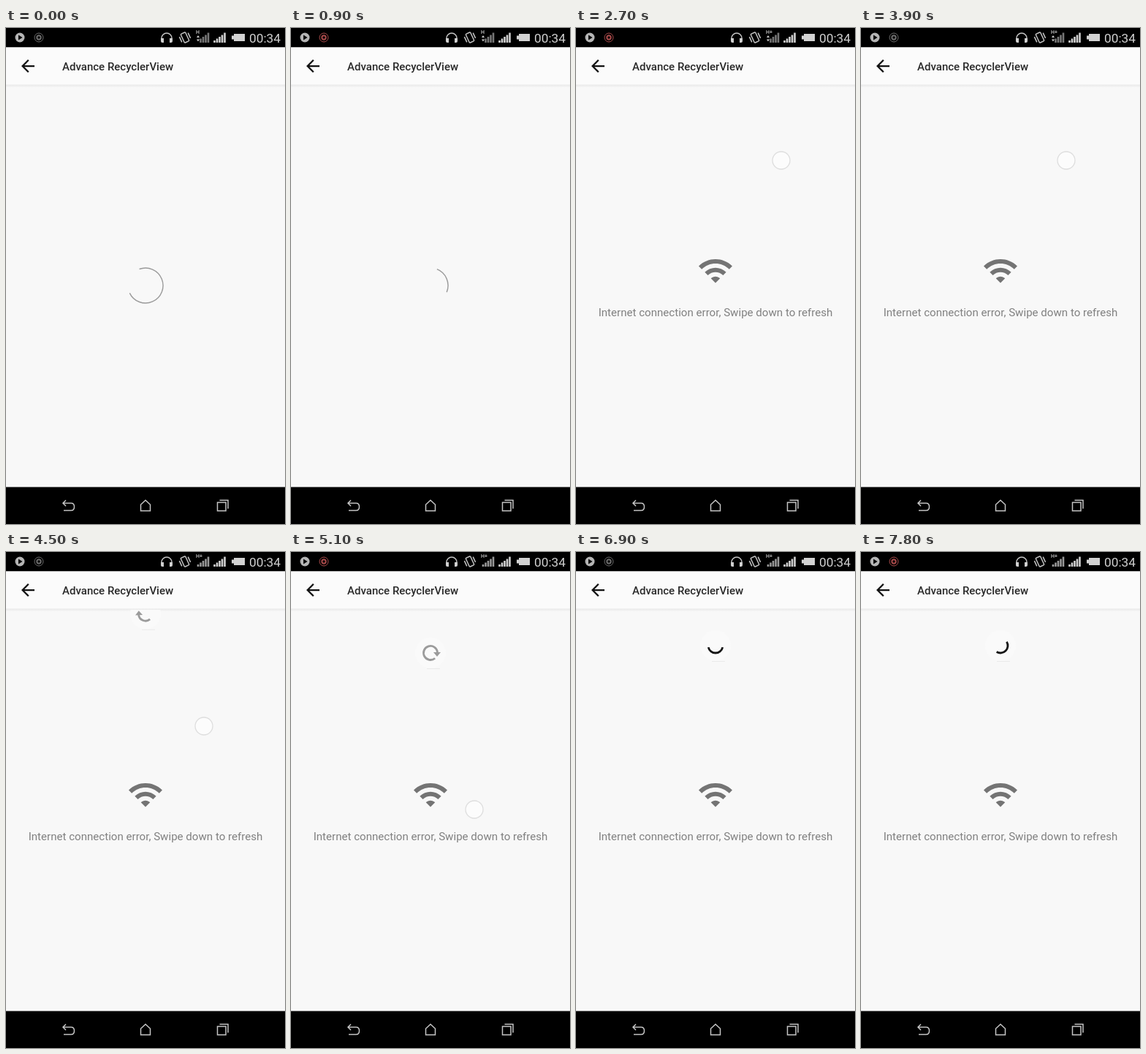
Animation of 382x678 px, one loop 8 s. Source, as an HTML page:

```html
<!DOCTYPE html>
<html lang="en">
<head>
<meta charset="utf-8">
<title>Pull to refresh</title>
<style>
  html, body { margin: 0; width: 100%; height: 100%; overflow: hidden; background: #000; }
  svg { display: block; width: 100%; height: 100%; font-family: Roboto, "Noto Sans", sans-serif; }
  .line { fill: none; stroke: #c4c4c4; stroke-width: 1.5; }
</style>
</head>
<body>
<svg viewBox="0 0 382 678">
  <defs>
    <linearGradient id="shade" x2="0" y2="1">
      <stop stop-color="#e9e9e9"/>
      <stop offset="1" stop-color="#f8f8f8"/>
    </linearGradient>
    <clipPath id="content"><path d="M0 79h382v548H0z"/></clipPath>
  </defs>

  <rect width="382" height="678"/>
  <rect y="26.5" width="382" height="601" fill="#f8f8f8"/>
  <rect y="26.5" width="382" height="51" fill="#fbfbfb"/>
  <rect y="77.5" width="382" height="4" fill="url(#shade)"/>
  <path transform="translate(16.5 38.5) scale(1.125)" fill="#111"
    d="M20 11H7.83l5.59-5.59L12 4l-8 8 8 8 1.41-1.41L7.83 13H20z"/>
  <text x="77" y="58" font-size="15" font-weight="500" fill="#2a2a2a">Advance RecyclerView</text>

  <!-- status bar -->
  <circle cx="19" cy="13" r="6.5" fill="#b5b5b5"/>
  <path d="M17 9.5l5.5 3.5-5.5 3.5z"/>
  <g id="record" fill="none">
    <circle cx="45" cy="13" r="6"/>
    <circle cx="45" cy="13" r="2.7" stroke-width="2"/>
  </g>
  <path class="line" stroke-width="2" d="M213 15v-1a7 7 0 0 1 14 0v1"/>
  <path fill="#d0d0d0" d="M212 14h4v6h-2q-2 0-2-2zM228 14h-4v6h2q2 0 2-2z"/>
  <g transform="rotate(-25 245 13)" class="line">
    <rect x="241.5" y="6.5" width="7" height="13" rx="1"/>
    <path d="M238.5 9v8M251.500 9v8"/>
  </g>
  <text id="net" x="260" y="7.500" font-size="7" font-weight="500" fill="#ccc"></text>
  <path id="arrows" fill="#ccc" d="M261 13l2-3 2 3zM261 15.500h4l-2 3z"/>
  <path id="bars" stroke-width="2.600"/>
  <path stroke="#d2d2d2" stroke-width="2.600" d="M285.500 20v-3M289 20v-5.500M292.500 20v-8M296 20v-10.500M299.500 20v-13.500"/>
  <path fill="#d2d2d2" d="M312 8h15v10h-15v-2.500h-3v-5h3z"/>
  <text x="333" y="20" font-size="17.300" fill="#d0d0d0">00:34</text>

  <!-- navigation bar -->
  <path class="line" d="M82 645.500l-4 4 4 4M78 649.500h11q4.500 0 4.500 5t-4.500 5h-10"/>
  <path class="line" d="M184.500 660v-8.500l6.500-6 6.500 6v8.500z"/>
  <path class="line" d="M289.500 648.500h11.500v11.500h-11.500zM292.500 645.500h11.500v11.500"/>

  <path id="loader" fill="none" stroke="#9a9a9a" stroke-width="1.400"/>
  <g id="error" fill="#747474">
    <path transform="translate(165.900 306.700) scale(2.090)" d="M1 9l2 2c4.970-4.970 13.030-4.970 18 0l2-2C16.930 2.930 7.080 2.930 1 9zm8 8l3 3 3-3c-1.650-1.660-4.340-1.660-6 0zm-4-4l2 2c2.760-2.760 7.240-2.760 10 0l2-2C15.140 9.140 8.870 9.140 5 13z"/>
    <text x="191" y="394" font-size="15.100" text-anchor="middle" fill="#808080">Internet connection error, Swipe down to refresh</text>
  </g>
  <g clip-path="url(#content)">
    <g id="refresh">
      <circle r="21" fill="#fafafa"/>
      <path d="M-5 21.500h18" stroke="#eaeaea"/>
      <path id="ring" fill="none" stroke-width="2.800"/>
      <path id="tip" d="M4 -1h10l-5 6z" fill="#9b9b9b"/>
    </g>
  </g>
  <circle id="touch" r="12" fill="#fcfcfc" stroke="#dedede" stroke-width="1.300"/>
</svg>
<script>
const LOOP = 8000, STEP = 300, TURN = 1333;
const $ = id => document.getElementById(id);
const set = (id, attrs) => {
  for (const k in attrs) $(id).setAttribute(k, attrs[k]);
};
const show = (id, on) => set(id, { visibility: on ? 'visible' : 'hidden' });
const mix = (a, b, p) => a + (b - a) * p;
const clamp = p => Math.max(0, Math.min(1, p));

function arc(cx, cy, r, start, sweep) {
  const at = deg => {
    const a = deg * Math.PI / 180;
    return `${cx + r * Math.cos(a)} ${cy + r * Math.sin(a)}`;
  };
  return `M${at(start)}A${r} ${r} 0 ${sweep > 180 ? 1 : 0} 1 ${at(start + sweep)}`;
}

// An arc that turns steadily while its length breathes; shortest at dt = 0.
function spin(cx, cy, r, dt, middle, mean, swing) {
  const sweep = mean - swing * Math.cos(dt / TURN * 2 * Math.PI);
  return arc(cx, cy, r, middle + 0.35 * dt - sweep / 2, sweep);
}

function draw(time) {
  const t = Math.floor(time / STEP) * STEP;
  const failed = t >= 1200, spinning = t >= 5400;
  const beat = t % 2400;
  const recording = beat >= 300 && beat <= 1200;
  const traffic = t < 4500;
  const pull = clamp((t - 4200) / 900);

  set('record', { stroke: recording ? '#a84a4a' : '#6c6c6c' });
  $('net').textContent = failed ? 'H+' : 'H';
  show('arrows', traffic);
  set('bars', {
    stroke: traffic ? '#777' : '#999',
    d: (traffic ? '' : 'M263 20v-3') + 'M266.5 20v-5.5M270 20v-8M273.5 20v-10.5M277 20v-13.5'
  });

  show('loader', !failed);
  set('loader', { d: spin(191, 352, 24, t - TURN / 2, 22 - 0.35 * TURN / 2 + 0.35 * TURN, 145, 120) });
  show('error', failed);

  show('touch', t >= 1500 && !spinning);
  set('touch', { cx: mix(281, 251, pull), cy: mix(181, 352, pull) });

  show('refresh', pull > 0);
  show('tip', pull > 0 && !spinning);
  set('refresh', { transform: `translate(191 ${spinning ? 128 : mix(58, 138, pull)})` });
  set('ring', spinning
    ? { stroke: '#151515', d: spin(0, 0, 10, t - 7350, 247.5, 105, 95) }
    : { stroke: '#9b9b9b', d: arc(0, 0, 9.5, 50, mix(30, 305, pull)) });
  set('tip', { transform: `rotate(${mix(-275, 0, pull)})` });
}

const begin = performance.now();
function frame() {
  draw((performance.now() - begin) % LOOP);
  requestAnimationFrame(frame);
}
frame();
</script>
</body>
</html>
```
